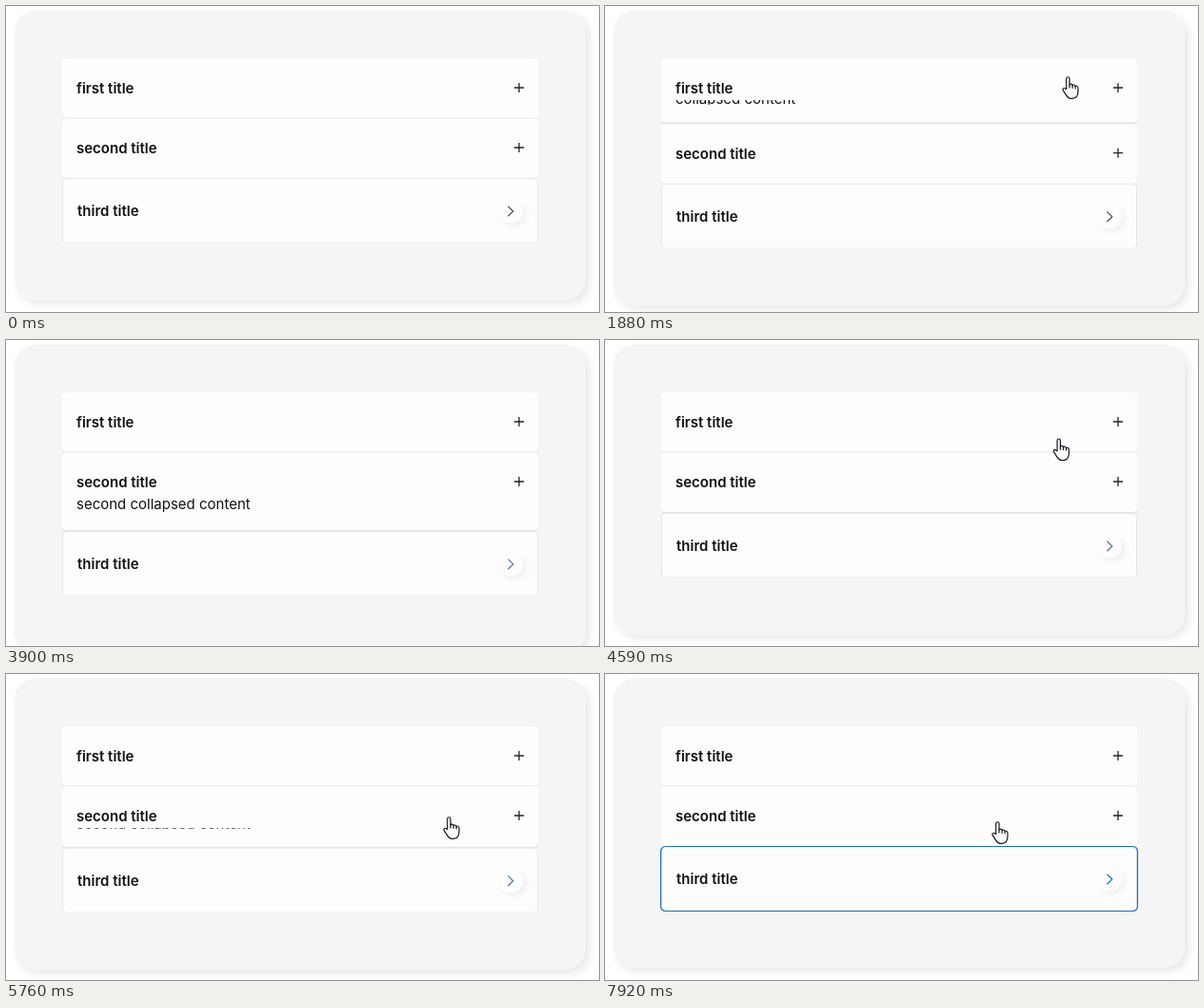
Write an HTML page that moves like this. It is 623 px wide and 322 px high and loops after 7.99 s.

```html
<!DOCTYPE html>
<html lang="en">
<head>
<meta charset="utf-8">
<title>Accordion</title>
<style>
  html, body { margin: 0; width: 100%; height: 100%; overflow: hidden; background: #fff; }
  svg { display: block; }
  text { font: 15px Inter, Arial, sans-serif; fill: #111; }
  .title { font-weight: 600; }
  #card { fill: #f5f5f5; filter: drop-shadow(4px 4px 4px rgba(0, 0, 0, .09)); }
  .edge { fill: #e6e6e6; }
  .face { fill: #fdfdfd; }
  .sign { stroke: #222; stroke-width: 1.3; }
  #knob { fill: #fdfdfd; filter: drop-shadow(3px 3px 3px rgba(0, 0, 0, .06)); }
  #disc { fill: #1a73f3; }
  #chevron { fill: none; stroke-width: 1.3; }
  #focus { fill: none; stroke: #1a70d8; stroke-width: 1.2; }
  #ring { fill: none; stroke: #444; }
  #hand path { fill: #fff; stroke: #15151f; stroke-width: 1.2; stroke-linejoin: round; stroke-linecap: round; }
</style>
</head>
<body>
<svg width="623" height="322">
  <rect id="card" x="9" y="5" width="600" rx="22"/>
  <g id="rows"></g>
  <g id="hand">
    <path d="M4.7 13.6V2.4C4.7 .2 8 .2 8 2.4V9C8.3 7.6 11 7.8 11.1 9.6 11.5 8.5 14 8.8 14.1 10.5 14.6 9.6 17 10 17 12.2V15.5C17 20.5 15 23.3 11 23.3H9.6C6.8 23.3 5.6 21.6 4.4 19.6L1.2 14.7C.2 12.9 2.2 11.6 3.5 12.7Z"/>
    <path d="M8 9V12M11.1 9.8V12.3M14.1 10.6V12.8"/>
    <circle id="ring" cx="6" r="11.3"/>
  </g>
</svg>
<script>
const LOOP = 7990, GROW = 31.5, SLIDE = 300;
const $ = id => document.getElementById(id);
const clamp = v => Math.min(1, Math.max(0, v));
const easeOut = v => 1 - (1 - clamp(v)) ** 3;
const easeInOut = v => { v = clamp(v); return v * v * (3 - 2 * v); };
const set = (el, attrs) => { for (const k in attrs) el.setAttribute(k, attrs[k]); };
const within = (spans, t) => spans.some(([a, b]) => t >= a && t < b);

// toggles: times at which each row opens and closes, alternately
const rows = [
  { name: 'first title', body: 'collapsed content', color: '#7a17e6', x: 74, base: 37,
    toggles: [1190, 1740], focus: [1200, 2220] },
  { name: 'second title', body: 'second collapsed content', color: '#1670ea', x: 74, base: 36.5,
    toggles: [3330, 3854, 4900, 5545], focus: [2220, 6090] },
  { name: 'third title', body: 'third collapsed content', color: '#1670ea', x: 75, base: 39,
    toggles: [6692, 7120], focus: [6090, LOOP] }
];
const shown = [[520, 2220], [2880, 3350], [4380, 6090], [7710, LOOP]];
const clicks = [[1070, 1205], [1610, 1740], [4800, 4920], [5350, 5545]];

$('rows').innerHTML = rows.map((row, i) => `
  <g>
    <rect class="edge" x="59" width="500" rx="4"/>
    <rect class="face" x="${i < 2 ? 59 : 60}" width="${i < 2 ? 500 : 498}" rx="4"/>
    <clipPath id="clip${i}"><rect x="59" width="500"/></clipPath>
    <text class="title" x="${row.x}" y="${row.base}">${row.name}</text>
    <g clip-path="url(#clip${i})"><text class="body" x="${row.x}">${row.body}</text></g>
    ${i < 2 ? `<path class="sign" transform="translate(539 ${row.base - 6})"/>` : `
    <circle id="knob" cx="530.5" cy="34" r="12.5"/>
    <circle id="disc" cx="530.5" cy="33.5" r="12.5"/>
    <path id="chevron" d="M-2.6-5.3L2.8 0L-2.6 5.3"/>
    <rect id="focus" x="58.6" y="-.5" width="500.9" rx="5"/>`}
  </g>`).join('');
rows.forEach((row, i) => row.el = $('rows').children[i]);

function openness(row, t) {
  const past = row.toggles.filter(at => at <= t);
  if (!past.length) return { open: false, amount: 0 };
  const open = past.length % 2 === 1;
  const done = easeOut((t - past[past.length - 1]) / SLIDE);
  return { open, amount: open ? done : 1 - done };
}

function focusOf({ focus: [from, to] }, t) {
  return clamp((t - from) / 110) * (to === LOOP ? 1 : 1 - clamp((t - to) / 110));
}

function handAt(t) {
  if (t < 2300) {
    const k = clamp((t - 500) / 370), v = easeInOut(k);
    return [618 - 138 * v, 99 - 25 * v - 44 * v * (1 - v) * v * 2];
  }
  if (t < 3400) return [479, 75];
  if (t < 6100) {
    const v = easeInOut((t - 4480) / 270);
    return [477 - 18 * v, 76 + 74 * v];
  }
  const v = easeInOut((t - 7690) / 230);
  return [459 - 53 * v, 148 + 7 * v];
}

function drawRow(row, i, y, t) {
  const { open, amount } = openness(row, t), focus = focusOf(row, t);
  const last = i === 2, find = s => row.el.querySelector(s);
  const face = (last ? 66.5 : 62.5) + GROW * amount;
  const border = last ? 0 : 1 + focus;
  set(row.el, { transform: `translate(0 ${y})` });
  set(find('.edge'), { height: face + border });
  set(find('.face'), { height: face });

  const top = row.base + 7, drift = last ? 3 : 26;
  set(find('clipPath rect'), { y: top, height: GROW * amount });
  set(find('.body'), { y: row.base + 33 - drift * (1 - amount) });
  find('.title').style.fill = open ? row.color : '';

  if (!last) {
    const sign = find('.sign');
    set(sign, { d: open ? 'M-5 0H5' : 'M-5 0H5M0-5V5' });
    sign.style.stroke = open ? row.color : '';
  } else {
    find('.body').style.fill = '#16406f';
    set($('disc'), { opacity: amount * 1.1 });
    set($('chevron'), {
      transform: `translate(530 34) rotate(${90 * amount})`,
      stroke: amount > .2 ? '#fff' : focus > .5 ? '#1677e8' : t < 2220 ? '#555' : '#5878a4'
    });
    set($('focus'), { height: face + 1.5, opacity: focus });
  }
  return y + face + border;
}

function draw(t) {
  let y = 55;
  rows.forEach((row, i) => y = drawRow(row, i, y, t));
  set($('card'), { height: y + 56 });
  set($('hand'), {
    transform: `translate(${handAt(t).join(' ')})`,
    visibility: within(shown, t) ? 'visible' : 'hidden'
  });
  set($('ring'), { opacity: +within(clicks, t) });
}

const start = performance.now();
function tick() {
  draw((performance.now() - start) % LOOP);
  requestAnimationFrame(tick);
}
tick();
</script>
</body>
</html>
```
